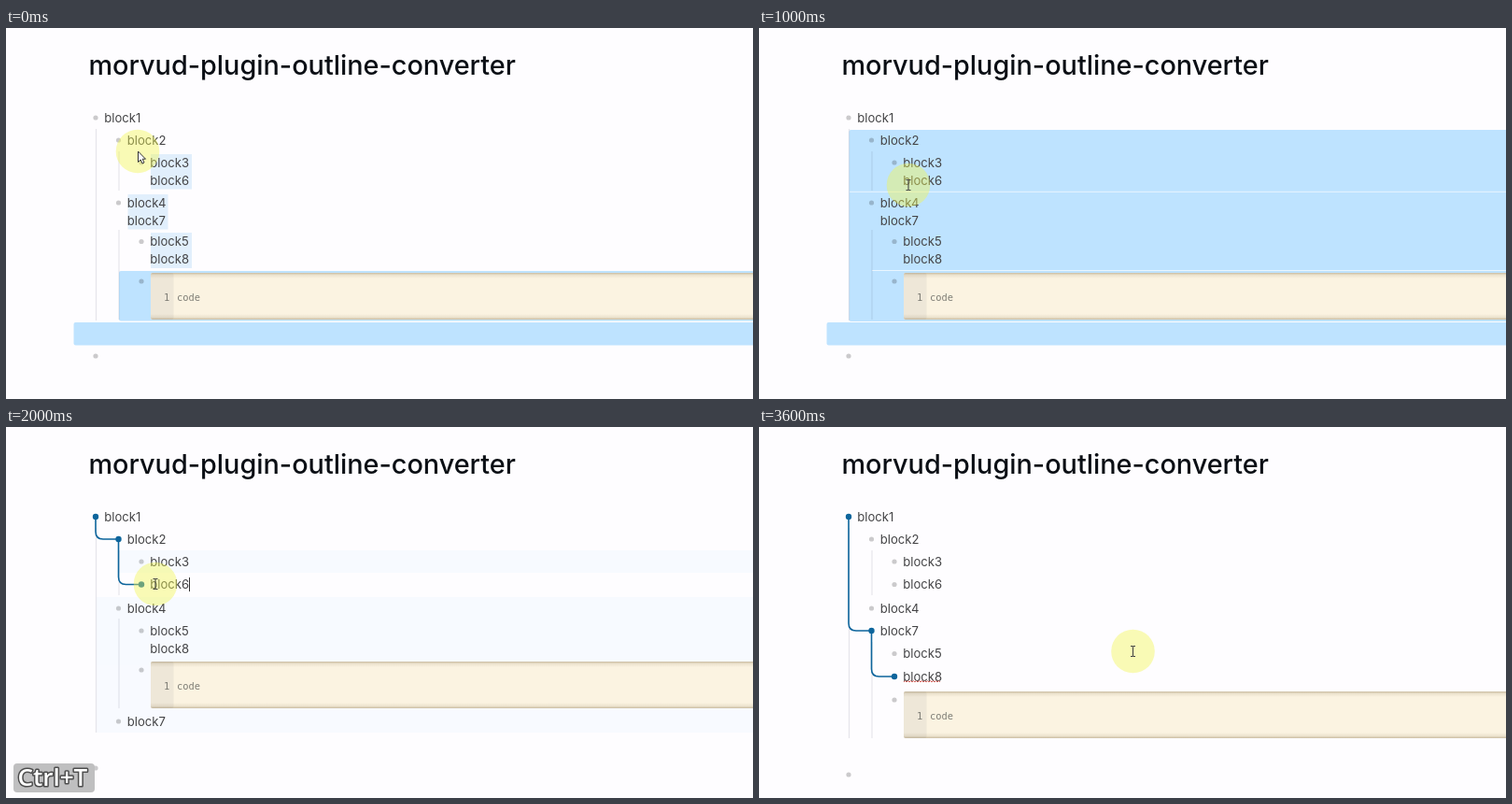
An HTML page that plays this animation: 800 px wide and 397 px high, repeating every 3700 ms.

```html
<!DOCTYPE html>
<html lang="en">
<head>
<meta charset="utf-8">
<title>Outline blocks</title>
<style>
  html, body { margin: 0; width: 100%; height: 100%; overflow: hidden; background: #fefdff; }
  svg { display: block; width: 100vw; height: 100vh; }
  text { font: 13.1px Inter, sans-serif; fill: #444446; white-space: pre; }
  .title { font-size: 28.8px; font-weight: 500; fill: #0b0f15; }
  .mono { font: 10.4px "DejaVu Sans Mono", monospace; fill: #7e7d75; }
  .key { font: 600 26px "Open Sans", sans-serif; fill: #fff; stroke: #4d4d4d; stroke-width: 3px; stroke-linejoin: round; paint-order: stroke; }
  .dot { fill: #000; fill-opacity: .2; }
  .guide { stroke: #3c3c5a; stroke-opacity: .12; stroke-width: 1.2; }
  .sel { fill: #bee3ff; }
  .mark { fill: #e1effc; }
  .gap { stroke: #eaf6ff; stroke-width: 1; }
  .thread { fill: none; stroke: #0d659c; stroke-width: 1.6; }
  .knot { fill: #0d659c; }
  .caret { stroke: #333; stroke-width: 1; }
  .wave { fill: none; stroke: #d5625c; stroke-width: 1; }
  .halo { fill: #f0f550; fill-opacity: .42; }
  .ptr { fill: #fff; stroke: #333; stroke-width: 1; stroke-linejoin: round; }
  .beam { fill: none; stroke: #444; stroke-width: 1.1; }
</style>
</head>
<body>
<svg viewBox="0 0 800 397" preserveAspectRatio="none">
  <defs>
    <linearGradient id="shade" x2="0" y2="1">
      <stop offset="0" stop-color="#6b5426" stop-opacity=".34"/>
      <stop offset=".05" stop-color="#6b5426" stop-opacity=".1"/>
      <stop offset=".12" stop-color="#6b5426" stop-opacity="0"/>
      <stop offset=".88" stop-color="#6b5426" stop-opacity="0"/>
      <stop offset=".95" stop-color="#6b5426" stop-opacity=".1"/>
      <stop offset="1" stop-color="#6b5426" stop-opacity=".34"/>
    </linearGradient>
  </defs>
  <text class="title" x="88.5" y="50.3">morvud-plugin-outline-converter</text>

  <g id="marks" class="mark">
    <rect x="155" y="135" width="44" height="37.500"/>
    <rect x="130.500" y="178" width="43" height="37.500"/>
    <rect x="155" y="219" width="44" height="38"/>
  </g>
  <g id="tail" class="sel">
    <rect x="121" y="260" width="680" height="53.500" rx="2"/>
    <rect x="72.500" y="315" width="730" height="24.500" rx="2"/>
  </g>
  <g id="all">
    <rect class="sel" x="96.500" y="109" width="706" height="205" rx="2"/>
    <path class="gap" d="M97 175.300H800M121 259.500H800"/>
  </g>
  <g id="fade" class="sel">
    <rect x="121" y="132" width="680" height="24"/>
    <rect x="97" y="182" width="704" height="145"/>
  </g>

  <g id="merged"></g>
  <g id="partial"></g>
  <g id="split"></g>
  <path id="fold" d="M102 117.500h9l-4.500 5z" fill="#aaa"/>
  <g id="thread6"></g>
  <g id="thread8"></g>
  <path id="caret6" class="caret" d="M196.500 161V176"/>
  <path id="caret8" class="caret" d="M196.500 260V275"/>
  <path id="wave" class="wave"/>

  <g id="badge">
    <rect x="8" y="360" width="87" height="31" rx="4" fill="#bfbfc0"/>
    <text class="key" x="12.500" y="384">Ctrl+T</text>
  </g>

  <g id="cursor">
    <circle class="halo" r="23.300"/>
    <path id="arrow" class="ptr" d="M.5 0V11.500L3.200 9 5 13 7 12 5.200 8.200H8.500Z"/>
    <path id="beam" class="beam" d="M-2.500-5.500H-.8L0-5 .8-5.500H2.500M0-5V5M-2.500 5.500H-.8L0 5 .8 5.500H2.500"/>
    <path id="hand" class="ptr" d="M0 0C1-1 2.200-.3 2.200 1V4.500L6 5.300C7.500 5.700 7.500 6.500 7.300 8L6.300 13H.5L-3.300 8C-3.600 6.800-2.200 6.400-1.300 7.400L-.5 8.200V1Z"/>
  </g>
</svg>
<script>
const LOOP = 3700, STEP = 100;
const COL = [96, 120.5, 145];
const $ = id => document.getElementById(id);

const row = (level, y, ...lines) =>
  `<circle class="dot" cx="${COL[level]}" cy="${y}" r="2.600"/>` +
  lines.map((s, i) => `<text x="${COL[level] + 9.3}" y="${y + 4.7 + i * 19.2}">${s}</text>`).join('');

const guide = (level, y1, y2) =>
  `<path class="guide" d="M${COL[level] + .5} ${y1}V${y2}"/>`;

const code = y => `
  <circle class="dot" cx="145" cy="${y + 9}" r="2.600"/>
  <rect x="155" y="${y}" width="650" height="50" rx="2" fill="#fbf3e1"/>
  <rect x="155" y="${y}" width="24.500" height="50" rx="2" fill="#eee7d8"/>
  <rect x="155" y="${y}" width="650" height="50" rx="2" fill="url(#shade)"/>
  <text class="mono" x="169" y="${y + 29.7}">1</text>
  <text class="mono" x="183" y="${y + 29.7}">code</text>`;

// Blue line from block1 through a parent row to the focused row
const thread = (mid, end) => {
  const [a, b, c] = COL;
  const bend = (x, y, to) => `V${y - 8}Q${x} ${y} ${x + 8} ${y}H${to}`;
  const knots = [[a, 96], [b, mid], [c, end]];
  return `<path class="thread" d="M${a} 96${bend(a, mid, b)}M${b} ${mid}${bend(b, end, c)}"/>` +
    knots.map(([x, y]) => `<circle class="knot" cx="${x}" cy="${y}" r="3.200"/>`).join('');
};

const top2 = row(0, 96, 'block1') + row(1, 120, 'block2');
$('merged').innerHTML = guide(0, 108, 313) + guide(1, 132, 174) + guide(1, 216, 312) + top2 +
  row(2, 144, 'block3', 'block6') + row(1, 187, 'block4', 'block7') +
  row(2, 228.5, 'block5', 'block8') + code(262) + row(0, 351);
$('partial').innerHTML = guide(0, 108, 327) + guide(1, 132, 180) + guide(1, 205, 301) + top2 +
  row(2, 144, 'block3') + row(2, 168.5, 'block6') + row(1, 194, 'block4') +
  row(2, 218, 'block5', 'block8') + code(251) + row(1, 315, 'block7') + row(0, 365);
$('split').innerHTML = guide(0, 108, 333) + guide(1, 132, 180) + guide(1, 230, 333) + top2 +
  row(2, 144, 'block3') + row(2, 168.5, 'block6') + row(1, 194, 'block4') + row(1, 218, 'block7') +
  row(2, 242.5, 'block5') + row(2, 267, 'block8') + code(283) + row(0, 372);
$('thread6').innerHTML = thread(120, 168.5);
$('thread8').innerHTML = thread(218, 267);
$('wave').setAttribute('d', 'M155 273' + 'l1.500-1.500l1.500 1.500'.repeat(13));

// Visible spans: [from, to) in ms
const spans = {
  marks: [[0, 300]],
  tail: [[0, 1900]],
  all: [[600, 1900]],
  fade: [[1900, 2100]],
  merged: [[0, 1900]],
  partial: [[1900, 2100]],
  split: [[2100, LOOP]],
  fold: [[500, 700]],
  thread6: [[1900, 2100]],
  thread8: [[2200, LOOP]],
  caret6: [[1900, 2100]],
  caret8: [[2200, 2600]],
  wave: [[2900, LOOP]],
  badge: [[1600, 2600]],
  arrow: [[0, 400]],
  beam: [[400, 1600], [1900, LOOP]],
  hand: [[1600, 1900]]
};

// Pointer path: time, x, y
const path = [
  [0, 141, 132], [200, 135, 68], [300, 135, 63], [500, 140, 123], [600, 139, 118],
  [700, 155, 215], [800, 178, 288], [900, 172, 225], [1000, 160, 168], [2900, 160, 168],
  [3000, 185, 173], [3100, 245, 196], [3200, 325, 230], [3300, 388, 250],
  [3400, 402, 243], [3500, 400.5, 240], [LOOP, 400.5, 240]
];

const ramp = (t, a, b) => Math.min(1, Math.max(0, (t - a) / (b - a)));

function pointer(t) {
  const i = path.findIndex(p => p[0] > t);
  const [t0, x0, y0] = path[i - 1], [t1, x1, y1] = path[i];
  const k = ramp(t, t0, t1);
  return [x0 + (x1 - x0) * k, y0 + (y1 - y0) * k];
}

function draw(now) {
  const t = Math.floor(now % LOOP / STEP) * STEP;
  for (const id in spans) {
    const on = spans[id].some(([a, b]) => t >= a && t < b);
    $(id).style.display = on ? '' : 'none';
  }
  $('fade').style.opacity = t < 2000 ? .35 : .1;
  $('badge').style.opacity = 1 - ramp(t, 2200, 2600);
  $('cursor').setAttribute('transform', `translate(${pointer(t)})`);
}

let start;
function tick(now) {
  start ??= now;
  draw(now - start);
  requestAnimationFrame(tick);
}
draw(0);
requestAnimationFrame(tick);
</script>
</body>
</html>
```
